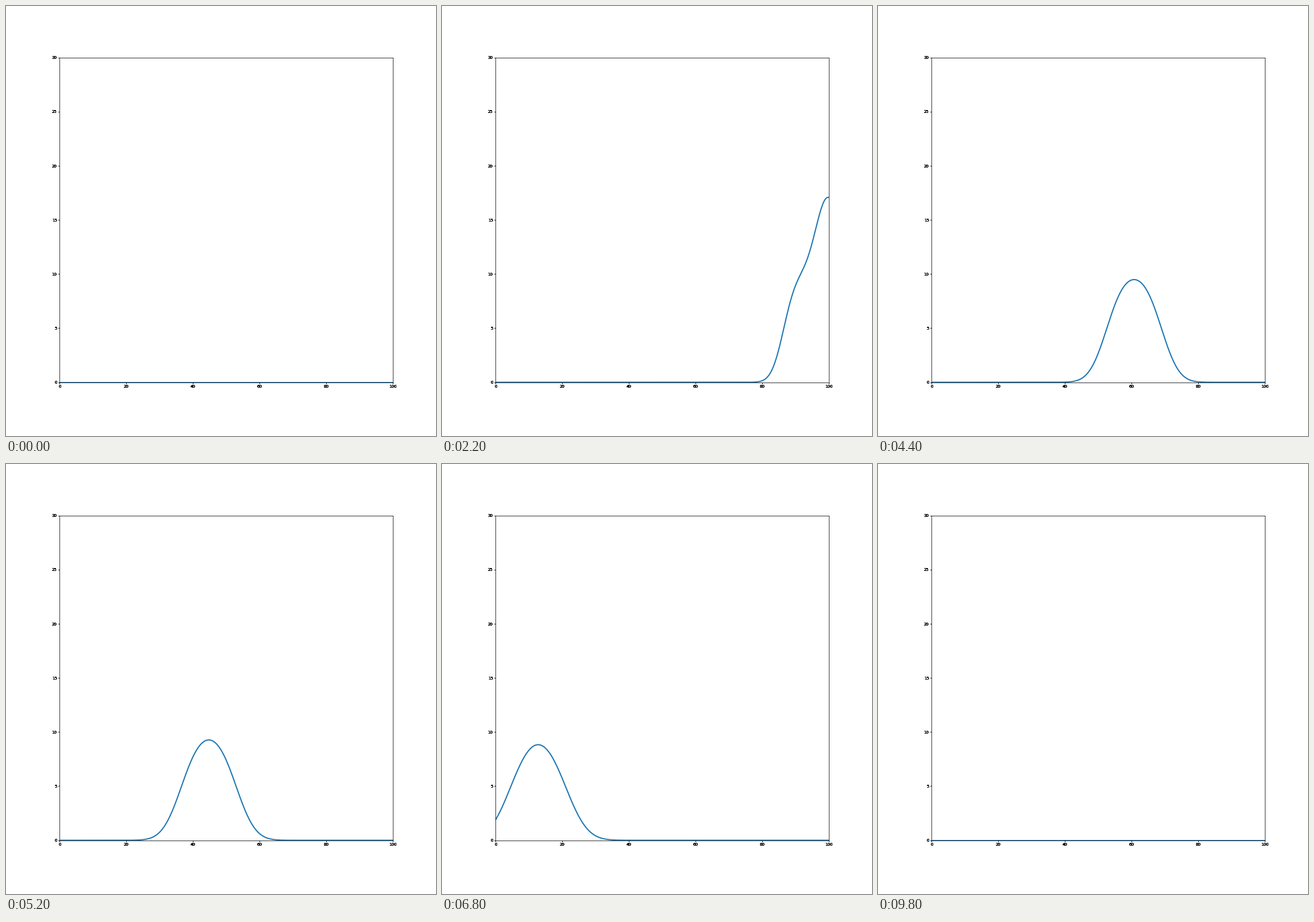
A matplotlib script that plays this animation: 748 by 748 pixels, repeating every 10 s.

```python
import math

import matplotlib.pyplot as plt
import numpy as np
from matplotlib.animation import FuncAnimation

SIZE, DPI = 748, 50
FRAMES, INTERVAL = 50, 200

START = 50.63     # pulse centre at time zero
HALF = 8.18       # half width of the initial square pulse
HEIGHT = 10
SPEED = 4         # units per frame
SPREAD = 1.6      # growth per frame of the squared edge width
WALL = 99.68      # reflecting end; the left end is open

erf = np.vectorize(math.erf)
x = np.linspace(0, 100, 501)


def pulse(d, width):
    """Square pulse with diffused edges, at distance d from its centre."""
    return HEIGHT / 2 * (erf((d + HALF) / width) - erf((d - HALF) / width))


def wave(i):
    if i == 0:
        return np.zeros_like(x)
    width = math.sqrt(SPREAD * i)
    centre = START + SPEED * i
    pos = np.minimum(x, WALL)
    return pulse(pos - centre, width) + pulse(2 * WALL - pos - centre, width)


fig = plt.figure(figsize=(SIZE / DPI, SIZE / DPI), dpi=DPI, facecolor="white")
# Just under 1/8, so that the spines snap to the lower pixel.
fig.subplots_adjust(left=0.12499, right=0.9, bottom=0.12499, top=0.88)


def add_axes():
    ax = fig.add_subplot(111)
    ax.set(xlim=(0, 100), ylim=(0, 30))
    ax.patch.set_visible(False)
    return ax


# Stacked axes give the labels their heavy look.
axes = [add_axes() for _ in range(4)]
for ax in axes[2:]:
    ax.spines[:].set_visible(False)
line, = axes[0].plot(x, wave(0), color="tab:blue", lw=3)


def update(i):
    line.set_ydata(wave(i))
    return line,


anim = FuncAnimation(fig, update, frames=FRAMES, interval=INTERVAL,
                     repeat=True, repeat_delay=0)
plt.show()
```
